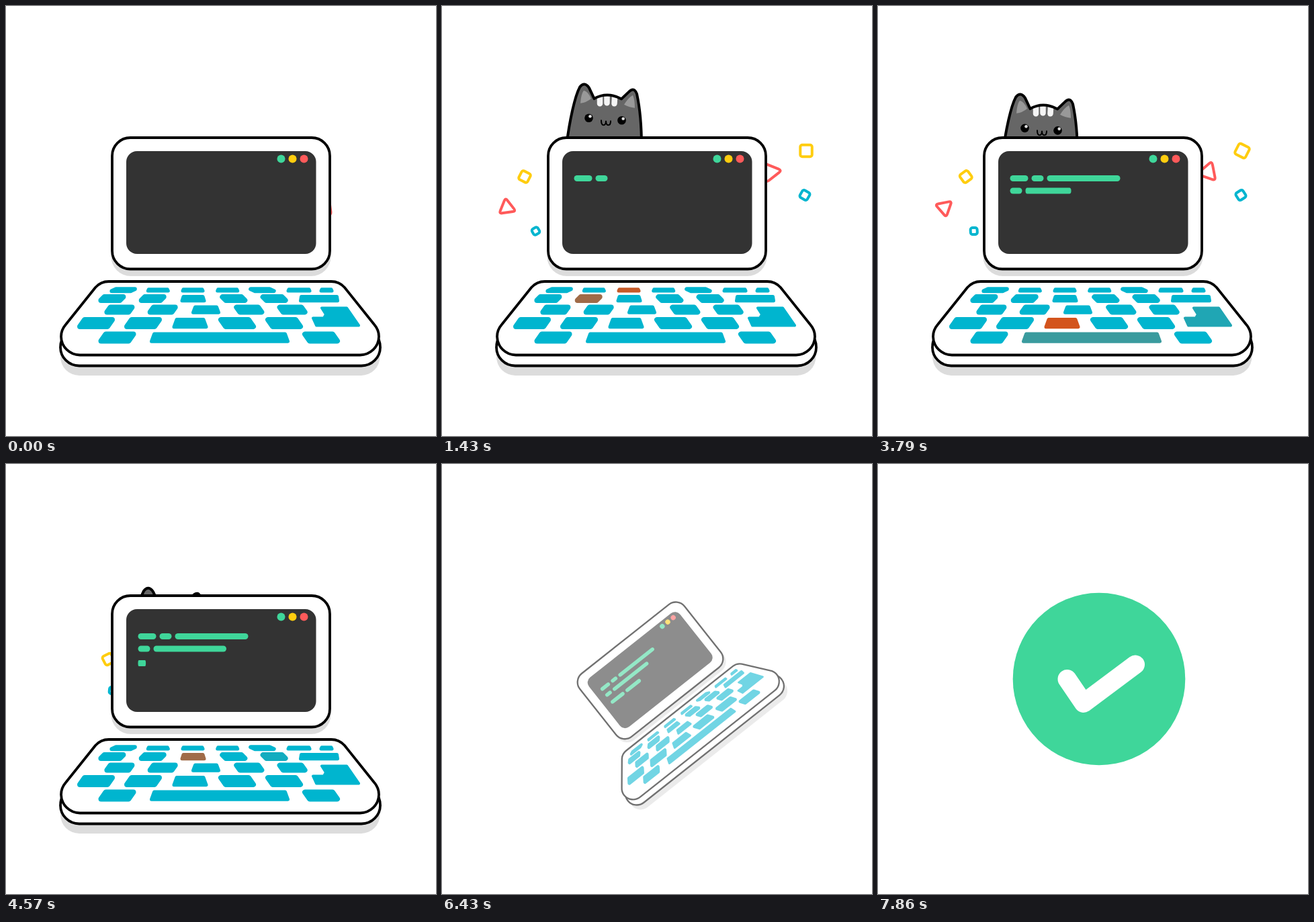
Recreate the animation shown at these times as an HTML page. Size 640 by 640 pixels, loop 9.57 s.

```html
<!DOCTYPE html>
<html lang="en">
<head>
<meta charset="utf-8">
<title>Cat and laptop</title>
<style>
  html, body { margin: 0; width: 100%; height: 100%; overflow: hidden; background: #fff; }
  svg { display: block; width: 100vw; height: 100vh; }
  .line { fill: #fff; stroke: #000; stroke-width: 3.8; stroke-linejoin: round; }
  .shade { fill: #dcdcdc; }
  #bits * { fill: none; stroke-width: 4; stroke-linejoin: round; }
  #keys * { stroke-linejoin: round; }
</style>
</head>
<body>
<svg viewBox="0 0 640 640">
  <defs>
    <path id="head" d="M185 205C190 165 198 130 205 117Q212 108 219 118L226.500 134Q246 123 267 134.500L278 124Q286 116 290 127C295 150 297 175 297 205"/>
    <clipPath id="inHead"><use href="#head"/></clipPath>
  </defs>
  <g id="bits"></g>
  <path id="heart" fill="#ff5a5a" stroke="#ff5a5a" stroke-width="2" stroke-linejoin="round"
    transform="translate(162.500 103) rotate(-21)" d="M0 18L-15 4.500A8.700 8.700 0 0 1 0 -6A8.700 8.700 0 0 1 15 4.500Z"/>
  <g id="cat">
    <use href="#head" fill="#666"/>
    <path fill="#999" d="M206 141Q207 127 211 122Q217 123 222 134Q215 140 206 141ZM271 143Q277 133 284 129Q287 136 287 148Q278 147 271 143Z"/>
    <path clip-path="url(#inHead)" fill="none" stroke="#f4f4f4" stroke-width="8.500" stroke-linecap="round" d="M235 124V141.500M245.500 124V140.500M257.500 124L256.500 141.500"/>
    <use href="#head" fill="none" stroke="#000" stroke-width="4" stroke-linejoin="round"/>
    <circle cx="218.500" cy="163" r="6.300"/><circle cx="267.500" cy="166.500" r="6.300"/>
    <circle cx="220.500" cy="160.500" r="2.300" fill="#ddd"/><circle cx="269.700" cy="164" r="2.300" fill="#ddd"/>
    <path fill="none" stroke="#000" stroke-width="2" stroke-linecap="round" d="M237 166.500Q237 173.500 240.500 173.500Q244 173.500 244 167Q244 173.500 247.500 173.500Q251 173.500 251 167.500"/>
  </g>
  <g id="laptop">
    <rect class="shade" x="156.500" y="206" width="327" height="196" rx="29"/>
    <rect class="line" x="158" y="196" width="324" height="195.500" rx="27"/>
    <rect x="179" y="216" width="282.500" height="153" rx="16" fill="#333"/>
    <circle cx="409.500" cy="227.500" r="6" fill="#3fd69a"/>
    <circle cx="426.500" cy="227.500" r="6" fill="#ffcd0f"/>
    <circle cx="443.500" cy="227.500" r="6" fill="#ff5a5a"/>
    <g id="code" fill="#3fd69a"></g>
    <rect class="shade" x="81" y="490" width="475.500" height="60" rx="28"/>
    <path class="line" d="M83 497Q81 502 81 508A28 27.500 0 0 0 109 535.500H529A28 27.500 0 0 0 557 508Q557 502 555 497Z"/>
    <path class="line" d="M153 410H484Q496 410 504 419L548 474Q555 482 555 492A28 28 0 0 1 527 519.500H110A28 28 0 0 1 82 492Q82 482 89 474L133 419Q141 410 153 410Z"/>
    <g id="keys"></g>
  </g>
  <g id="done">
    <circle r="128.300" fill="#3fd69a"/>
    <path fill="none" stroke="#fff" stroke-width="28" stroke-linecap="round" stroke-linejoin="round" d="M-47.500 0L-23 36L54 -21.500"/>
  </g>
</svg>
<script>
const LOOP = 9570, FPS = 14;
const $ = id => document.getElementById(id);
const clamp = v => Math.min(1, Math.max(0, v));
const ramp = (t, from, to) => clamp((t - from) / (to - from));
const ease = u => (1 - Math.cos(Math.PI * u)) / 2;
const mix = (a, b, u) => a + (b - a) * u;

function add(parent, tag, attrs) {
  const el = document.createElementNS('http://www.w3.org/2000/svg', tag);
  set(el, attrs);
  return $(parent).appendChild(el);
}
function set(el, attrs) {
  for (const k in attrs) el.setAttribute(k, attrs[k]);
}

// A key leans to one side, or without a lean flares a little towards the bottom
const keys = [];
function addKey(cx, y, w, h, lean, flare) {
  const r = lean ? Math.min(4, h / 3) : 2.5;
  const half = w / 2 - r, top = y + r + !lean, low = y + h - r - !lean * 0.8;
  const a = cx - lean / 2, b = cx + lean / 2, f = lean ? 0 : flare / 2;
  keys.push(add('keys', 'path', {
    'stroke-width': 2 * r,
    d: `M${a - half + f} ${top}H${a + half - f}L${b + half + f} ${low}H${b - half - f}Z`
  }));
}
// Five keys around a middle one, leaning away from it
function addRow(mid, step, y, w, h, lean, flare) {
  for (let i = -2; i <= 2; i++)
    addKey(mid + i * step, y, w, h, lean(i), flare);
}
addRow(278, 51.7, 418.3, 34, 9, i => 6.5 * Math.trunc(i / 2), 1);
addKey(436, 418.3, 36, 9, 0, 1);
addKey(477, 418.3, 20, 9, 0, 1);
addRow(278.5, 60.3, 429, 36, 13, i => 5 * Math.sign(i), 2);
addKey(466, 429, 59, 13, 0, 1);
addRow(297.5, 64.3, 444.5, 40, 15, i => 5 * Math.sign(i), 3);
addRow(274, 70, 463, 49, 18, i => 7 * Math.sign(i), 4);
addKey(165.5, 484.5, 49, 18, -7);
addKey(318, 484.5, 204, 18, 0, 4);
addKey(469, 484.5, 49, 18, 7);
keys.push(add('keys', 'path', {
  'stroke-width': 4,
  d: 'M470 449.500H507L525 475.500H462L457 464.500H473L476 459Z'
}));

// Typing score, a slot per 0.1 s: letters name the keys in order, "!" is enter
const NAMES = 'abcdefghijklmnopqrstuvwxyz!';
const score = '...o..x.f.' + '.n..ci.y..' + '.....l.hd.' + '..q...y.u.' + '!.r..j..l.' + '...u.l.k';
const heatOf = (name, t) => [...score].reduce(
  (heat, c, i) => c === name ? Math.max(heat, 1 - Math.abs(t - i / 10) / 0.25) : heat, 0);

// Code lines, each word is [width, time typing starts]
const TYPE_SPEED = 127;
const words = [];
function addLine(y, ...line) {
  let x = 196.5;
  for (const [w, start] of line) {
    words.push({ w, start, el: add('code', 'rect', { x, y, height: 9, ry: 4.5 }) });
    x += w + 5;
  }
}
addLine(252, [27, 0.5], [18, 1], [109, 1.5]);
addLine(270.5, [18, 2.9], [108.5, 3.25]);
addLine(292, [40.5, 4.48], [45.5, 5.1]);

// Confetti slides out from behind the screen, spins and sways around (x, y)
const SPIN = 126;
const bits = [
  { color: '#ffcd0f', size: 17.5, x: 542, y: 215.5, sway: 0, turn: 0, in: 0.2, out: 3.8 },
  { color: '#00b5cf', size: 12.5, x: 540, y: 281.5, sway: 0, turn: 30, in: 0.3, out: 3.95 },
  { color: '#ff5a5a', size: 17, tri: true, x: 491, y: 247, sway: 2, turn: 22, in: -0.28, out: 3.85 },
  { color: '#ffcd0f', size: 14.5, x: 129.7, y: 254, sway: 6.7, turn: 27, in: 0.3, out: 4.3 },
  { color: '#ff5a5a', size: 14.5, tri: true, x: 98.5, y: 300, sway: 2, turn: 52, in: 0.1, out: 4 },
  { color: '#00b5cf', size: 10, x: 142.3, y: 335, sway: 2.8, turn: -30, in: 0.4, out: 4.3 }
];
function roundTriangle(R) {
  const p = [0, 1, 2].map(i => i * Math.PI * 2 / 3).map(a => [R * Math.sin(a), -R * Math.cos(a)]);
  const near = (i, j) => p[i].map((v, k) => mix(v, p[j][k], 0.18));
  return 'M' + [0, 1, 2].map(i => `${near(i, (i + 2) % 3)}Q${p[i]} ${near(i, (i + 1) % 3)}`).join('L') + 'Z';
}
for (const b of bits) {
  const s = b.size;
  b.el = b.tri
    ? add('bits', 'path', { stroke: b.color, d: roundTriangle(s) })
    : add('bits', 'rect', { stroke: b.color, x: -s / 2, y: -s / 2, width: s, height: s, rx: 3 });
}

function drawBit(b, t) {
  const e = ease(ramp(t, b.in, b.in + 0.6)) * (1 - ease(ramp(t, b.out, b.out + 0.6)));
  const hideX = b.x < 320 ? 180 : 460;
  const x = mix(hideX, b.x - b.sway * Math.cos(3.4 * (t - 1.43)), e);
  set(b.el, { transform: `translate(${x} ${mix(340, b.y, e)}) rotate(${b.turn + SPIN * t})` });
}

function draw(t) {
  bits.forEach(b => drawBit(b, t));

  const drop = t < 2 ? Math.pow(1 - t / 2, 2.7) : ease(ramp(t, 3.2, 5.2));
  set($('cat'), { transform: `translate(0 ${0.7 + 92 * drop})` });
  $('cat').style.display = $('bits').style.display = t < 5 ? '' : 'none';
  $('heart').style.opacity = ramp(t, 1.6, 1.9) * (1 - ramp(t, 2.25, 2.8));

  for (const { el, w, start } of words) {
    const u = clamp((t - start) * TYPE_SPEED / w);
    set(el, { width: w * u, rx: 4.5 * u });
  }

  keys.forEach((key, i) => {
    const h = heatOf(NAMES[i], t);
    const color = `rgb(${mix(0, 224, h)},${mix(181, 78, h)},${mix(207, 18, h)})`;
    set(key, { fill: color, stroke: color });
  });

  const away = ramp(t, 6.2, 6.79);
  set($('laptop'), {
    transform: `translate(320 320) rotate(${-99 * away}) scale(${1 - away}) translate(-320 -320)`,
    opacity: clamp(1 - 1.15 * away)
  });

  const pop = 1.17 * ease(ramp(t, 6.8, 7.2)) - 0.17 * ease(ramp(t, 7.2, 7.57));
  set($('done'), { transform: `translate(329 320) scale(${pop})` });
}

const start = performance.now();
function tick() {
  const ms = (performance.now() - start) % LOOP;
  draw(Math.floor((ms + 5) * FPS / 1000) / FPS);
  requestAnimationFrame(tick);
}
tick();
</script>
</body>
</html>
```
